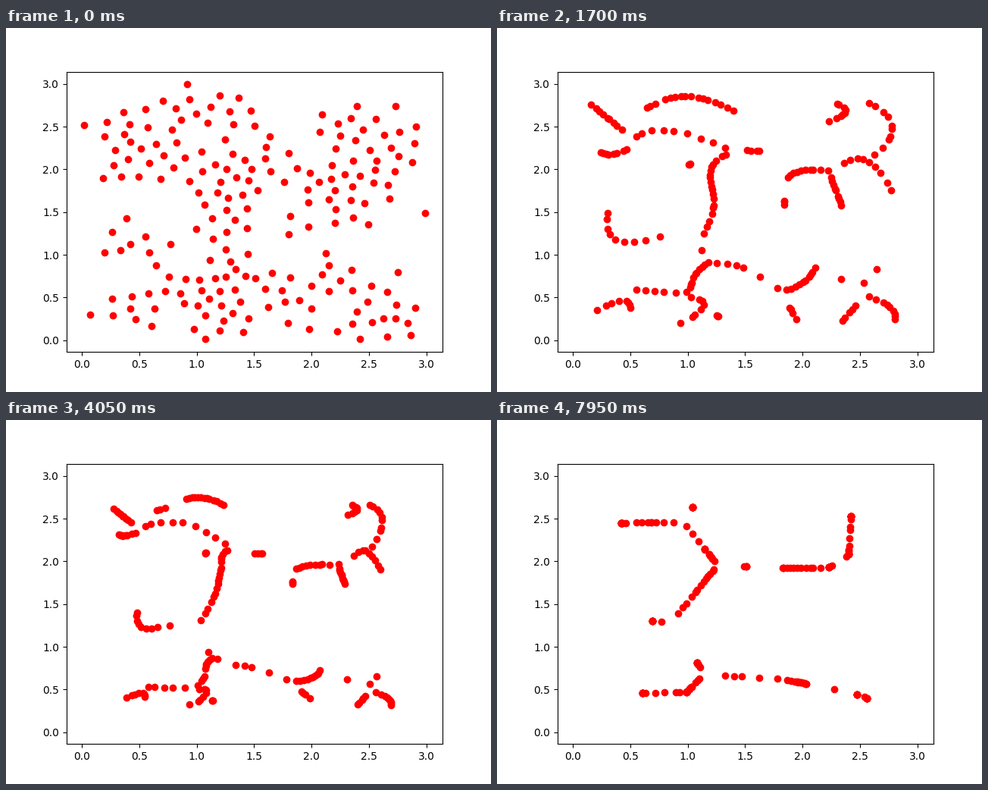
Write a matplotlib script that moves like this. It is 640x480 px and loops after 8 s.

```python
import numpy as np
import matplotlib.pyplot as plt
from matplotlib.animation import FuncAnimation

FRAMES, STEP_MS = 160, 50
GATHERED = 19  # frame at which the dots have formed threads
LOW, HIGH = np.array([0.018, 0.0115]), np.array([2.99, 2.9945])
rng = np.random.default_rng(12)


def thread(n, *points):
    """n dots, unevenly spaced, on the smooth curve through a few points."""
    u = np.linspace(0, 1, n) + rng.normal(0, 0.25 / n, n)
    u = np.clip(u, 0, 1)
    deg = len(points) - 1
    knots = np.linspace(0, 1, len(points))
    return np.column_stack([np.polyval(np.polyfit(knots, c, deg), u)
                            for c in np.transpose(points)])


threads = np.concatenate([
    # upper left
    thread(9, (.11, 2.82), (.43, 2.47)),
    thread(8, (.20, 2.16), (.32, 2.12), (.47, 2.19)),
    thread(9, (.55, 2.35), (.74, 2.46), (1.05, 2.40), (1.38, 2.27)),
    thread(4, (1.52, 2.28), (1.66, 2.27)),
    thread(16, (.64, 2.77), (1.00, 2.90), (1.47, 2.70)),
    thread(20, (1.36, 2.19), (1.19, 1.93), (1.25, 1.62), (1.12, 1.08)),
    thread(3, (.98, 2.04), (1.00, 2.05)),
    thread(9, (.76, 1.20), (.32, 1.15), (.23, 1.57)),
    # upper right
    thread(10, (1.87, 1.90), (2.00, 2.00), (2.22, 1.99)),
    thread(3, (1.84, 1.58), (1.84, 1.52)),
    thread(9, (2.25, 1.90), (2.36, 1.50)),
    thread(9, (2.36, 2.08), (2.62, 2.08), (2.84, 1.69)),
    thread(10, (2.67, 2.17), (2.85, 2.50), (2.61, 2.83)),
    thread(9, (2.19, 2.57), (2.36, 2.70), (2.27, 2.82)),
    # lower left
    thread(8, (.13, .33), (.40, .46), (.48, .34)),
    thread(6, (.53, .62), (.98, .57)),
    thread(8, (.94, .15), (1.16, .38), (1.03, .50)),
    thread(3, (1.30, .25), (1.32, .24)),
    thread(10, (1.01, .62), (1.07, .78), (1.21, .94)),
    # lower right
    thread(6, (1.29, .92), (1.47, .90), (1.78, .61)),
    thread(10, (1.85, .58), (2.02, .71), (2.13, .93)),
    thread(4, (1.87, .36), (1.93, .18)),
    thread(3, (2.26, .81), (2.55, .72), (2.68, .91)),
    thread(9, (2.59, .53), (2.80, .38), (2.85, .21)),
    thread(5, (2.32, .18), (2.46, .41)),
])

# the lines everything settles on
bones = [
    [(.42, 2.45), (.96, 2.46), (1.04, 2.63)],
    [(.96, 2.46), (1.26, 1.96), (1.51, 1.94)],
    [(1.26, 1.96), (.85, 1.28), (.69, 1.30)],
    [(1.82, 1.92), (2.23, 1.93), (2.40, 2.08), (2.42, 2.53)],
    [(.61, .46), (.99, .47), (1.15, .69), (1.08, .81)],
    [(1.15, .68), (1.84, .62), (2.28, .50)],
    [(2.47, .44), (2.56, .40)],
]


def nearest_on_bones(p):
    best = None
    for bone in bones:
        for a, b in zip(np.array(bone[:-1]), np.array(bone[1:])):
            t = np.clip((p - a) @ (b - a) / ((b - a) @ (b - a)), 0, 1)
            q = a + t * (b - a)
            dist = np.hypot(*(p - q))
            if best is None or dist < best[0]:
                best = dist, q
    return best[1]


def scatter(p):
    """Shake the dots and push close ones apart until they fill the square."""
    p = p + rng.normal(0, 0.1, p.shape)
    for _ in range(9):
        gap = p[:, None] - p[None]
        dist = np.hypot(gap[..., 0], gap[..., 1]) + 1e-6
        push = np.clip(0.22 - dist, 0, None) / dist
        p = p + 0.07 * (gap * push[..., None]).sum(axis=1)
    low, high = p.min(axis=0), p.max(axis=0)
    return LOW + (p - low) / (high - low) * (HIGH - LOW)


start = scatter(threads)
settled = np.array([nearest_on_bones(p) for p in threads])


def pace(frame):
    """Fast at first, slower and slower later."""
    return np.sqrt(frame + 8)


def place(frame):
    if frame < GATHERED:
        a, b, t0, t1 = start, threads, 0, GATHERED
    else:
        a, b, t0, t1 = threads, settled, GATHERED, FRAMES - 1
    s = (pace(frame) - pace(t0)) / (pace(t1) - pace(t0))
    return a + s * (b - a)


fig, ax = plt.subplots(figsize=(6.4, 4.8), dpi=100)
margin = 0.05 * (HIGH - LOW)
ax.set_xlim(LOW[0] - margin[0], HIGH[0] + margin[0])
ax.set_ylim(LOW[1] - margin[1], HIGH[1] + margin[1])
dots, = ax.plot([], [], "ro")


def update(frame):
    dots.set_data(*place(frame).T)
    return dots,


anim = FuncAnimation(fig, update, frames=FRAMES, interval=STEP_MS,
                     repeat=True, repeat_delay=0)
plt.show()
```
